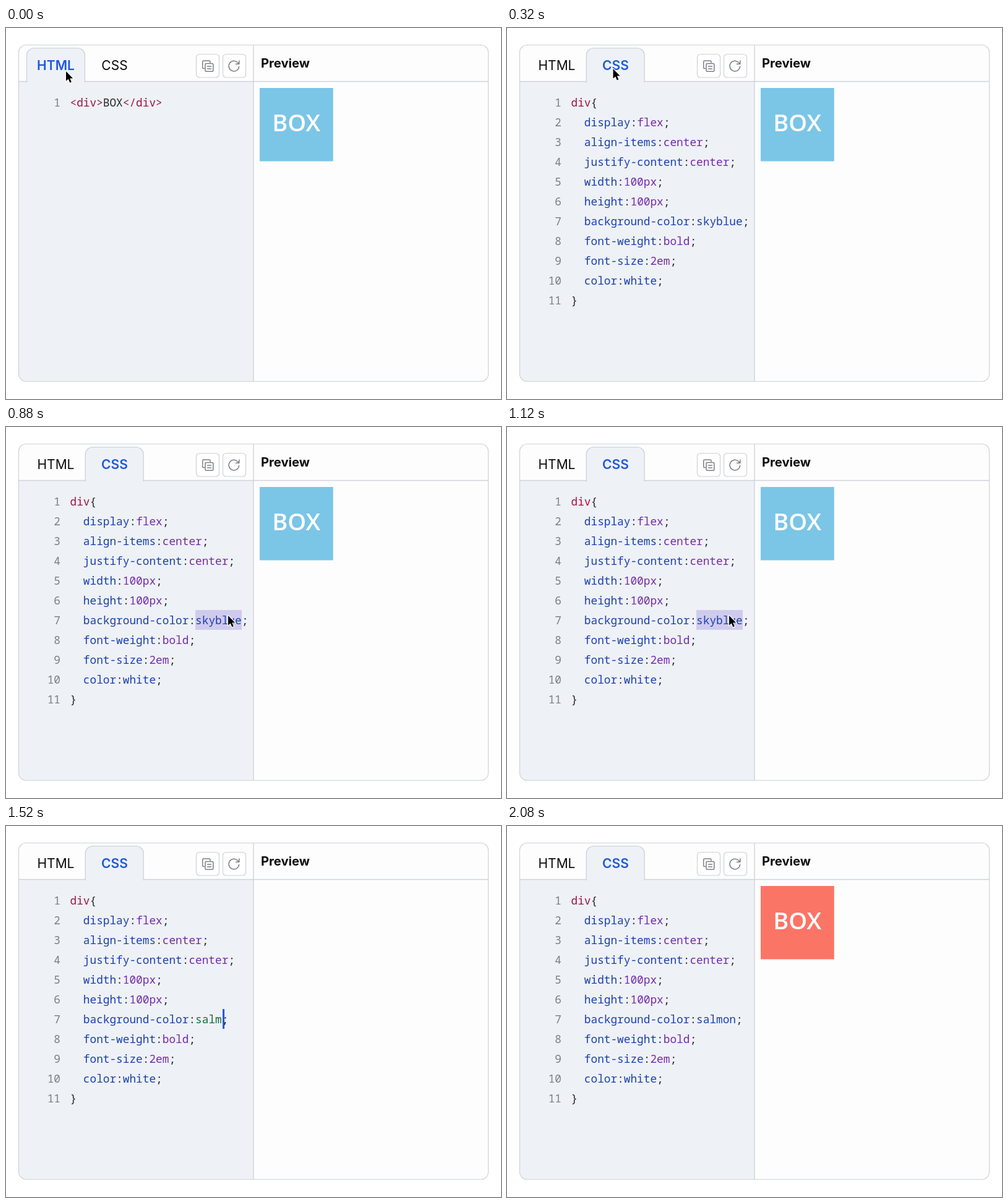
An HTML page for the animation above (2.16 s loop, 800 px wide and 600 px high).

```html
<!DOCTYPE html>
<html lang="en">
<head>
<meta charset="utf-8">
<title>Code editor with live preview</title>
<style>
  html, body { margin: 0; width: 100%; height: 100%; overflow: hidden; background: #fff; }
  svg { display: block; }
  .ui { font-family: Inter, "Liberation Sans", sans-serif; font-size: 21px; fill: #0a0a0a; }
  .tab { text-anchor: middle; }
  .tab.on { font-weight: 600; fill: #1f58df; }
  .title { font-size: 20.2px; font-weight: 700; }
  .box { font: 600 37.9px "Open Sans", "Noto Sans", sans-serif; fill: #fff; text-anchor: middle; }
  .code { font: 500 17.78px "Noto Sans Mono", "DejaVu Sans Mono", monospace; }
  .num { font-weight: 400; fill: #7b7e84; text-anchor: end; }
  .tag { fill: #a2143f; }
  .prop { fill: #1a41ad; }
  .val { fill: #742ba9; }
  .word { fill: #186b38; }
  .punc { fill: #24262b; }
  .line { fill: none; stroke: #ced2da; }
  .icon { fill: none; stroke: #7c7e84; stroke-width: 1.5; stroke-linecap: round; stroke-linejoin: round; }
</style>
</head>
<body>
<svg width="800" height="600" viewBox="0 0 800 600">
  <rect x="20.5" y="27.5" width="759" height="544" rx="12" fill="#fdfdfd"/>
  <path d="M20.5 87H400V571.5H32.5a12 12 0 0 1 -12 -12Z" fill="#eef1f6"/>
  <path class="line" d="M20.5 86.5H779.5M400 27.5V571.5" stroke-width="1.3"/>
  <rect class="line" x="20.5" y="27.5" width="759" height="544" rx="12" stroke-width="1.2"/>

  <path id="tabShape" d="M33.5 88V44.5a12 12 0 0 1 12 -12H115.5a12 12 0 0 1 12 12V88" fill="#eef1f6" stroke="#c9ced8" stroke-width="1.2"/>
  <text id="tabHtml" class="ui tab" x="80.5" y="68">HTML</text>
  <text id="tabCss" class="ui tab" x="175.5" y="68">CSS</text>
  <text class="ui title" x="412" y="64">Preview</text>

  <g fill="#fff" stroke="#ced1d7" stroke-width="1.2">
    <rect x="307.5" y="42.5" width="37" height="37.5" rx="5"/>
    <rect x="350.5" y="42.5" width="37" height="37.5" rx="5"/>
  </g>
  <g class="icon">
    <path d="M320.5 65.5h-1.3a1.5 1.5 0 0 1 -1.5 -1.5V54.5a1.5 1.5 0 0 1 1.5 -1.5H328.5a1.5 1.5 0 0 1 1.5 1.5v1.5"/>
    <rect x="322" y="57.5" width="12.8" height="12.8" rx="1.5"/>
    <path d="M325.5 62h6M325.5 66h6"/>
    <path d="M376.6 62.5A8.3 8.3 0 1 1 374.3 55.8L376.6 58M376.8 53V58.3H371.5"/>
  </g>

  <g id="preview">
    <rect id="box" x="410" y="97" width="118.7" height="118.5"/>
    <text class="box" x="469.2" y="167">BOX</text>
  </g>

  <rect id="select" x="306" y="296" width="75" height="32" fill="#cfcbee"/>
  <g id="html" class="code"></g>
  <g id="css" class="code"></g>
  <rect id="caret" y="296" width="3" height="32" fill="#2159d9"/>
  <circle id="ring" cx="358.5" cy="306" r="25.5" fill="none" stroke="#0a0a0a" stroke-width="2"/>
  <path id="arrow" d="M0 0V15.8L3.7 12.4L6.3 18.4L8.9 17.3L6.3 11.4H11.2Z" fill="#000" stroke="#fff" stroke-width="2.4" stroke-linejoin="round" paint-order="stroke"/>
</svg>
<script>
const LOOP = 2160, STEP = 80;
const LEFT = 103.5, TOP = 127, ROW = 32, CHAR = 17.78 * 0.6;
const VALUE_X = LEFT + 19 * CHAR;
const $ = id => document.getElementById(id);
const show = (id, on) => $(id).setAttribute("visibility", on ? "visible" : "hidden");

function add(parent, name, attrs, text = "") {
  const el = document.createElementNS("http://www.w3.org/2000/svg", name);
  for (const key in attrs) el.setAttribute(key, attrs[key]);
  el.textContent = text;
  return parent.appendChild(el);
}

// parts: [class, text] pairs
function addRow(parent, n, indent, parts) {
  const y = TOP + (n - 1) * ROW;
  add(parent, "text", { class: "num", x: 88, y }, n);
  const line = add(parent, "text", { x: LEFT + indent * CHAR, y });
  return parts.map(([cls, text]) => add(line, "tspan", { class: cls }, text));
}

addRow($("html"), 1, 0, [["tag", "<div>"], ["punc", "BOX"], ["tag", "</div>"]]);

const rules = `display:flex align-items:center justify-content:center width:100px height:100px
  background-color:skyblue font-weight:bold font-size:2em color:white`.split(/\s+/);
let colorName;
addRow($("css"), 1, 0, [["tag", "div"], ["punc", "{"]]);
rules.forEach((rule, i) => {
  const [prop, value] = rule.split(":");
  const kind = prop.endsWith("color") ? "prop" : "val";
  const spans = addRow($("css"), i + 2, 2,
    [["prop", prop], ["punc", ":"], [kind, value], ["punc", ";"]]);
  if (value === "skyblue") colorName = spans[2];
});
addRow($("css"), rules.length + 2, 0, [["punc", "}"]]);

const path = [[0, 97, 70], [80, 118, 69], [160, 162, 66.5], [240, 171.5, 66], [320, 171.5, 66],
  [400, 205, 110], [480, 285, 215], [560, 348, 292], [640, 359, 305]];
const typing = [1200, 1360, 1440, 1520, 1680, 1760];
const SWITCH = 240, CLICK = 640, SELECT = 800, TYPE = typing[0], DONE = 2000;

function pointer(t) {
  const i = path.findIndex(p => p[0] > t);
  if (i < 0) return path[path.length - 1].slice(1);
  const [a, b] = [path[i - 1], path[i]];
  const k = (t - a[0]) / (b[0] - a[0]);
  return [1, 2].map(j => a[j] + (b[j] - a[j]) * k);
}

function draw(t) {
  const css = t >= SWITCH;
  $("tabShape").setAttribute("transform", `translate(${css ? 94.7 : 0})`);
  $("tabHtml").classList.toggle("on", !css);
  $("tabCss").classList.toggle("on", css);
  show("html", !css);
  show("css", css);

  const typed = typing.filter(at => t >= at).length;
  colorName.textContent = typed ? "salmon".slice(0, typed) : "skyblue";
  colorName.setAttribute("class", typed > 0 && typed < 6 ? "word" : "prop");

  show("preview", t < TYPE || t >= DONE);
  $("box").setAttribute("fill", t < TYPE ? "#7bc5e6" : "#fa7566");

  show("select", t >= SELECT && t < TYPE);
  show("caret", t >= CLICK && t < SELECT || t >= TYPE && t < DONE);
  $("caret").setAttribute("x", VALUE_X + (typed || 5) * CHAR + 1.2);

  show("ring", t >= CLICK && t < CLICK + STEP || t >= SELECT && t < SELECT + STEP);
  show("arrow", t < TYPE);
  $("arrow").setAttribute("transform", `translate(${pointer(t)})`);
}

const start = performance.now();
function tick() {
  const t = (performance.now() - start) % LOOP;
  draw(Math.floor(t / STEP) * STEP);
  requestAnimationFrame(tick);
}
tick();
</script>
</body>
</html>
```
